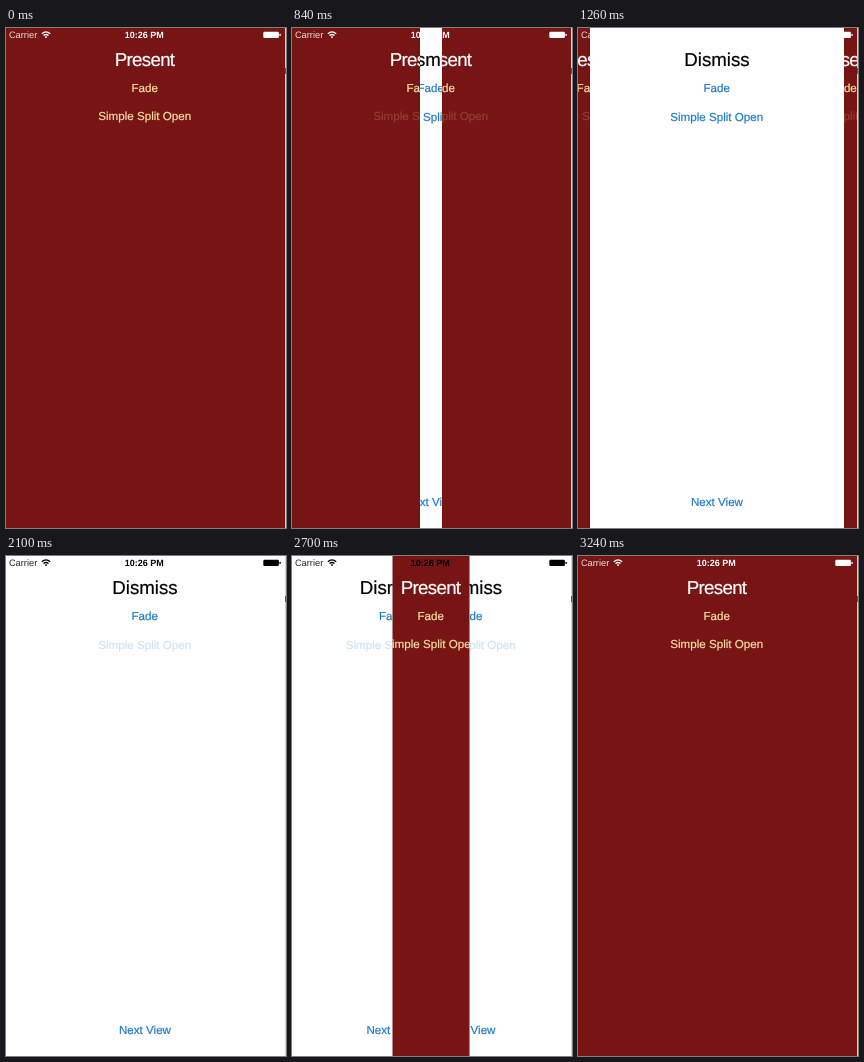
Write an HTML page that moves like this. It is 280x500 px and loops after 3.54 s.

```html
<!DOCTYPE html>
<html lang="en">
<head>
<meta charset="utf-8">
<title>Split transition</title>
<style>
  html, body { margin: 0; width: 100%; height: 100%; overflow: hidden; }
  svg { display: block; width: 280px; height: 500px; }
  text {
    font: 11.6px "Liberation Sans", Arial, sans-serif;
    text-anchor: middle;
    text-rendering: geometricPrecision;
  }
  .title { font-size: 18.7px; }
  #present { fill: #fbe3a4; stroke: #fbe3a4; stroke-width: .2; }
  #present .title { fill: #fff; stroke: #fff; letter-spacing: -.7px; }
  #dismiss { fill: #1f7ac6; stroke: #1f7ac6; stroke-width: .2; }
  #dismiss .title { fill: #000; stroke: #000; }
  #status .carrier { font-size: 9.3px; text-anchor: start; opacity: .85; }
  #status .clock { font-size: 9px; font-weight: bold; }
</style>
</head>
<body>
<svg viewBox="0 0 280 500">
  <defs>
    <clipPath id="leftHalf"><rect width="139" height="500"/></clipPath>
    <clipPath id="rightHalf"><rect x="139" width="141" height="500"/></clipPath>
    <g id="present">
      <rect width="280" height="500" fill="#771414" stroke="none"/>
      <text class="title" x="138.6" y="37.8">Present</text>
      <text x="138.7" y="63.6">Fade</text>
      <text id="presentSplit" x="138.7" y="92.2">Simple Split Open</text>
    </g>
    <g id="dismiss">
      <rect width="280" height="500" fill="#fefefe" stroke="none"/>
      <text class="title" x="139" y="38.2">Dismiss</text>
      <text x="138.7" y="64.3">Fade</text>
      <text id="dismissSplit" x="138.7" y="92.9">Simple Split Open</text>
      <text x="139" y="478">Next View</text>
    </g>
  </defs>

  <use id="under"/>
  <g id="left"><g clip-path="url(#leftHalf)"><use class="over"/></g></g>
  <g id="right"><g clip-path="url(#rightHalf)"><use class="over"/></g></g>

  <g id="status">
    <text class="carrier" x="2.9" y="10">Carrier</text>
    <g fill="none" stroke-width="1.3">
      <path d="M35.8 5.8 Q40 2 44.2 5.8"/>
      <path d="M37.5 7.6 Q40 5.4 42.5 7.6"/>
    </g>
    <path d="M38.6 8.8 Q40 7.7 41.4 8.8 L40 10.3 Z"/>
    <text class="clock" x="138.3" y="10">10:26 PM</text>
    <rect x="257.3" y="3.8" width="15.6" height="6.2" rx="1.2"/>
    <rect x="273.5" y="5.7" width="1.2" height="2.4" rx=".5"/>
  </g>
  <rect x="279" width="1" height="500" fill="#d4d4d4"/>
  <rect x="279" y="40" width="1" height="6" fill="#555"/>
</svg>
<script>
const LOOP = 3540, STEP = 60, FULL = 141;
const byId = id => document.getElementById(id);
const halves = document.querySelectorAll('.over');
const clamp = v => Math.min(1, Math.max(0, v));

// Accelerates from start to (t1, gap1), then settles from (t2, gap2) to fully open.
function splitGap(t, start, t1, gap1, t2, gap2, end) {
  return t <= t1
    ? gap1 * clamp((t - start) / (t1 - start)) ** 2.67
    : FULL - (FULL - gap2) * (1 - clamp((t - t2) / (end - t2))) ** 3;
}

function draw(t) {
  const opening = t < 1500, closing = !opening && t < 3240;
  const [over, under] = closing ? ['dismiss', 'present'] : ['present', 'dismiss'];
  const gap = opening ? splitGap(t, 600, 1080, 70, 1080, 70, 1512)
    : closing ? splitGap(t, 2220, 2700, 38.5, 2760, 75, 3240) : 0;

  byId('under').setAttribute('href', '#' + under);
  halves.forEach(half => half.setAttribute('href', '#' + over));
  byId('left').setAttribute('transform', `translate(${-gap})`);
  byId('right').setAttribute('transform', `translate(${gap})`);
  byId('presentSplit').setAttribute('opacity', opening && t >= 480 ? .2 : 1);
  byId('dismissSplit').setAttribute('opacity', closing && t >= 2100 ? .2 : 1);

  const ink = closing ? '#000' : '#fff';
  byId('status').setAttribute('fill', ink);
  byId('status').querySelector('g').setAttribute('stroke', ink);
}

function tick() {
  const t = performance.now() % LOOP;
  draw(Math.floor(t / STEP) * STEP);
  requestAnimationFrame(tick);
}
tick();
</script>
</body>
</html>
```
